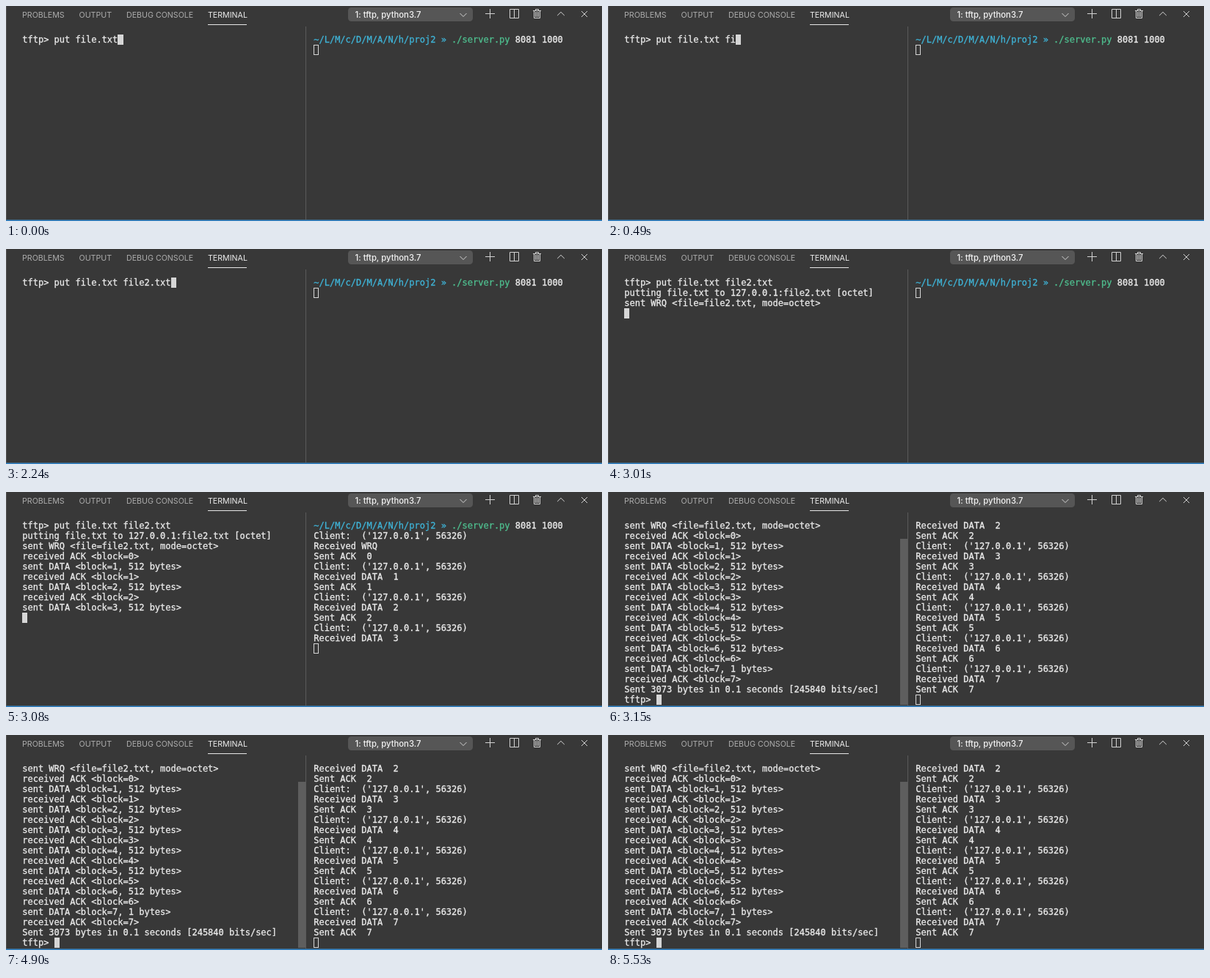
An HTML page that plays this animation: 812x294 px, repeating every 5810 ms.

```html
<!DOCTYPE html>
<html lang="en">
<head>
<meta charset="utf-8">
<title>Terminal file transfer</title>
<style>
  html, body { margin: 0; width: 100%; height: 100%; overflow: hidden; background: #383838; }
  svg { display: block; }
  text { white-space: pre; }
  .tab { font: 10.65px Inter, "Liberation Sans", sans-serif; fill: #adadad; }
  .tab.active { fill: #ececec; }
  .pick { font: 500 11.3px Inter, "Liberation Sans", sans-serif; fill: #f2f2f2; }
  .row { font: 12px "DejaVu Sans Mono", "Liberation Mono", monospace; fill: #ececec; stroke: #ececec; stroke-width: 0.3; }
  .path { fill: #3fb3d6; stroke: #3fb3d6; }
  .cmd { fill: #4fbf8f; stroke: #4fbf8f; }
  .icon { fill: none; stroke: #d2d2d2; }
</style>
</head>
<body>
<svg width="812" height="294" viewBox="0 0 812 294">
  <rect width="812" height="294" fill="#383838"/>
  <rect width="1" height="292" fill="#525252"/>

  <text class="tab" x="22" y="16">PROBLEMS</text>
  <text class="tab" x="99.5" y="16">OUTPUT</text>
  <text class="tab" x="164" y="16">DEBUG CONSOLE</text>
  <text class="tab active" x="275" y="16">TERMINAL</text>
  <rect x="275" y="25" width="53" height="1" fill="#e7e7e7"/>

  <rect x="466" y="2" width="170" height="19" rx="4.5" fill="#565656"/>
  <text class="pick" x="475.5" y="16">1: tftp, python3.7</text>

  <g class="icon">
    <path d="M618.5 10 L623 14.5 L627.5 10"/>
    <path d="M653 10.5 H666 M659.5 4 V17"/>
    <path d="M686.5 4.5 H698.5 V16.5 H686.5 Z M692.5 4.5 V16.5"/>
    <path d="M718 6.5 H729 M721.5 6.5 V4.5 H725.5 V6.5 M719.5 6.5 V16.5 H727.5 V6.5 M721.5 8 V15 M723.5 8 V15 M725.5 8 V15"/>
    <path d="M751.2 13 L756 8.3 L760.8 13"/>
    <path d="M784 7 L792 15 M792 7 L784 15"/>
  </g>

  <rect x="408" y="28" width="1" height="264" fill="#5a5a5a"/>
  <rect id="scrollbar" x="398" y="64" width="10" height="227" fill="#5e5e5e"/>
  <g id="client"></g>
  <g id="server"></g>
  <rect id="solid" height="14" fill="#d6d6d6"/>
  <rect id="hollow" width="6" height="13" fill="none" stroke="#d6d6d6"/>
  <rect y="292" width="812" height="1" fill="#3d6a8c"/>
  <rect y="293" width="812" height="1" fill="#2e7fc4"/>
</svg>
<script>
const LOOP = 5810, ROWS = 18, TOP = 39, LINE = 14, CELL = 7.2266;
const byId = id => document.getElementById(id);

const START = "tftp> put file.txt";
const TYPED = " file2.txt";
const KEY_TIMES = [140, 350, 490, 630, 910, 1190, 1470, 1610, 1960, 2170];
const PEER = "Client:  ('127.0.0.1', 56326)";

const clientLog = [
  START + TYPED,
  "putting file.txt to 127.0.0.1:file2.txt [octet]",
  "sent WRQ <file=file2.txt, mode=octet>",
  "received ACK <block=0>"
];
const serverLog = [
  [["path", "~/L/M/c/D/M/A/N/h/proj2 » "], ["cmd", "./server.py"], ["", " 8081 1000"]],
  PEER, "Received WRQ", "Sent ACK  0"
];
for (let n = 1; n <= 7; n++) {
  clientLog.push(`sent DATA <block=${n}, ${n < 7 ? 512 : 1} bytes>`, `received ACK <block=${n}>`);
  serverLog.push(PEER, `Received DATA  ${n}`, `Sent ACK  ${n}`);
}
clientLog.push("Sent 3073 bytes in 0.1 seconds [245840 bits/sec]", "tftp> ");
serverLog.push("");

// Lines present in each pane once the transfer starts
const PHASES = [
  { at: 3010, client: 3, server: 1 },
  { at: 3080, client: 9, server: 12 },
  { at: 3150, client: clientLog.length, server: serverLog.length }
];

function makePane(id, x) {
  const rows = Array.from({ length: ROWS }, (_, i) => {
    const el = document.createElementNS("http://www.w3.org/2000/svg", "text");
    el.setAttribute("class", "row");
    el.setAttribute("x", x);
    el.setAttribute("y", TOP + LINE * i + 11);
    byId(id).append(el);
    return el;
  });
  return { x, rows };
}

function fillRow(el, line) {
  if (typeof line === "string") {
    el.textContent = line;
    return;
  }
  el.replaceChildren(...line.map(([cls, str]) => {
    const span = document.createElementNS("http://www.w3.org/2000/svg", "tspan");
    span.setAttribute("class", cls);
    span.textContent = str;
    return span;
  }));
}

// Shows the last rows and returns the cell after the final line
function drawPane(pane, lines) {
  const shown = lines.slice(-ROWS);
  pane.rows.forEach((el, i) => fillRow(el, shown[i] || ""));
  const row = shown.length - 1;
  const edge = col => Math.round(pane.x + col * CELL);
  const col = shown[row].length;
  return { x: edge(col), y: TOP + LINE * row, width: edge(col + 1) - edge(col) };
}

function place(id, cell, inset) {
  const el = byId(id);
  el.setAttribute("x", cell.x + inset);
  el.setAttribute("y", cell.y + inset);
  el.setAttribute("width", cell.width - 2 * inset);
}

const client = makePane("client", 22.25);
const server = makePane("server", 419.25);
let lastKey = "";

function draw(t) {
  const typed = KEY_TIMES.filter(k => k <= t).length;
  const phase = PHASES.filter(p => p.at <= t).pop();
  const key = typed + ":" + (phase ? phase.at : 0);
  if (key === lastKey) return;
  lastKey = key;

  const take = (log, n) => n < log.length ? [...log.slice(0, n), ""] : log;
  const left = phase ? take(clientLog, phase.client) : [START + TYPED.slice(0, typed)];
  const right = take(serverLog, phase ? phase.server : 1);
  place("solid", drawPane(client, left), 0);
  place("hollow", drawPane(server, right), 0.5);
  byId("scrollbar").setAttribute("visibility", left.length > ROWS ? "visible" : "hidden");
}

const began = performance.now();
function tick() {
  draw((performance.now() - began) % LOOP);
  requestAnimationFrame(tick);
}
tick();
</script>
</body>
</html>
```
